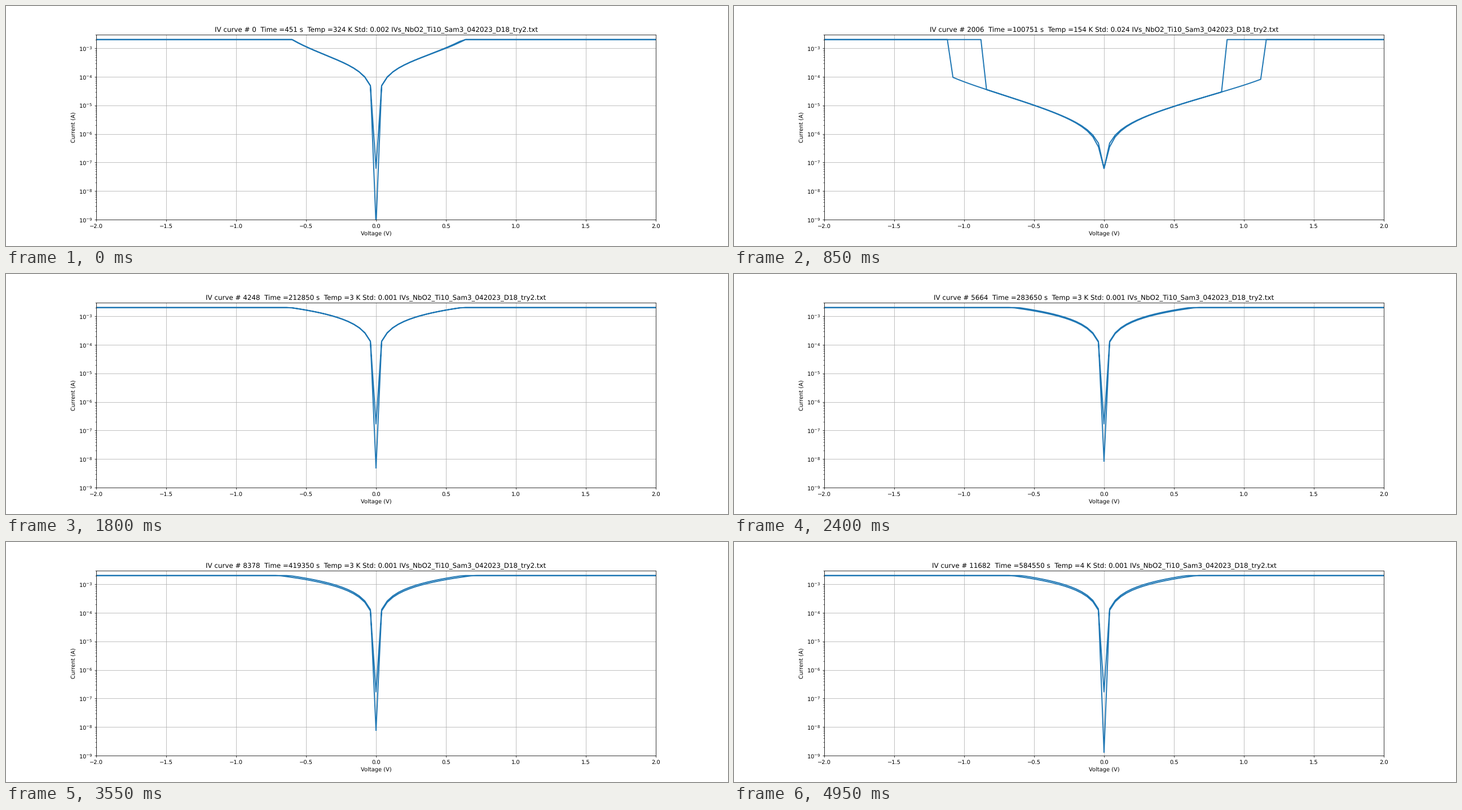
These frames come from a looping animation (1280x427 px, 5000 ms). A matplotlib script:

```python
import numpy as np
import matplotlib.pyplot as plt
from matplotlib.animation import FuncAnimation

FRAMES, INTERVAL = 100, 50
W, H = 1280, 427
DPI = W / 18                      # an 18 inch wide plot
STEP, LIMIT = 0.04, 2.03e-3       # sweep step (V), compliance current (A)
COLD, BREAKDOWN = 34, 29          # cooling ends; the film turns ohmic
FILE = "IVs_NbO2_Ti10_Sam3_042023_D18_try2.txt"

# sweep 0 -> 2 -> 0 -> -2 -> 0 as step counts
leg = np.arange(51)
ramp = np.r_[leg, leg[-2::-1]]
volts = np.r_[ramp, -ramp[1:]] * STEP
jitter = np.random.default_rng(7).normal(0, 0.08, FRAMES)


def temperature(n):
    cooling = 324 - 10 * n + np.clip(n - 17, 0, 8)
    return max(3 + n / 190, cooling)


def temp_std(n):
    if n == 0:
        return 0.002
    return 0.0244 - 0.00005 * n if n < COLD else 0.001


def conductance(n):
    """Variable-range hopping: log G is linear in T^(-1/4)."""
    return 10 ** (-2.914 - 43.2 * (temperature(n) ** -0.25 - 324 ** -0.25))


def residual(n):
    """Current left at 0 V where the sweep starts and ends (log10)."""
    return max(-9.2, -7.9 - 0.0006 * (n - 62) ** 2 + jitter[n])


def polarity(n, side):
    """Last insulating step, first step of the holding range, switching current."""
    u = n / 25
    if side > 0:
        on, hold, trip = 0.64 + 1.16 * u ** 2.25, 0.88 + 0.03 * (n - 17), 8.2e-5
    else:
        on, hold, trip = 0.6 + u ** 1.9, 0.88 + 0.025 * (n - 17), 9.6e-5
    fade = max(0, 1 - n / 17)
    trip *= (LIMIT / trip) ** fade
    return round(on / STEP), round(max(0.64, hold) / STEP), trip


def insulating_half(n, side, offset):
    """Current magnitude for one polarity: up leg, then down leg."""
    g = conductance(n)
    on, hold, trip = polarity(n, side)
    power = 1 + 1.4 * max(0, 1 - n / 25) ** 1.15
    r = leg / on
    growth = np.log(trip / (g * on * STEP)) * (0.92 * r ** power + 0.08 * r ** 8)
    warm = 1 + 0.1 * max(0, side) * max(0, 1 - n / 8)

    ohmic = g * leg * STEP
    up = ohmic * np.exp(growth) + offset
    down = np.abs(ohmic * np.exp(warm * growth) - offset)
    up[leg > on] = LIMIT
    if on < leg[-1]:
        down[leg >= hold] = LIMIT
    return np.r_[up, down[-2::-1]]


def ohmic_half(n):
    mean = 3.18e-3 + 0.13e-3 * np.cos(2 * np.pi * (n - 36) / 55)
    gap = 0.19e-3 * (1 - np.exp(-max(0, n - COLD) / 15))
    v = leg * STEP
    return np.r_[(mean - gap) * v, (mean + gap) * v[-2::-1]]


def current(n):
    if n < BREAKDOWN:
        ratio = 0.163 - 0.006 * (n - 17)
        middle = min(6.2e-8, ratio * conductance(n) * STEP)
        pos, neg = (insulating_half(n, s, middle) for s in (1, -1))
        mix = min(1, n / 17)
    else:
        middle, mix = 1.7e-7, 0
        pos = neg = ohmic_half(n)
    amps = np.r_[pos, neg[1:]]
    amps[len(ramp) - 1] = middle
    amps[[0, -1]] = 10 ** ((1 - mix) * residual(n) + mix * np.log10(middle))
    return np.minimum(amps, LIMIT)


def caption(n):
    count = 118 * n
    seconds = 50 * count + round(450.9 - 0.013 * n)
    return (f"IV curve # {count}  Time ={seconds} s  "
            f"Temp ={temperature(n):.0f} K Std: {temp_std(n):.3f} {FILE}")


plt.rcParams["text.hinting"] = "none"
fig, ax = plt.subplots(figsize=((W + 0.01) / DPI, (H + 0.01) / DPI), dpi=DPI)
fig.subplots_adjust(left=0.125, right=0.9, bottom=0.1104, top=0.8803)
line, = ax.plot(volts, current(0), color="#1f77b4", lw=2)
ax.set_yscale("log")
ax.set_xlim(-2, 2)
ax.set_ylim(1e-9, 3e-3)
ax.set_xlabel("Voltage (V)")
ax.set_ylabel("Current (A)")
ax.grid(True)
title = ax.set_title(caption(0))


def update(n):
    line.set_ydata(current(n))
    title.set_text(caption(n))
    return line, title


anim = FuncAnimation(fig, update, frames=FRAMES, interval=INTERVAL,
                     repeat=True, blit=False)
plt.show()
```
